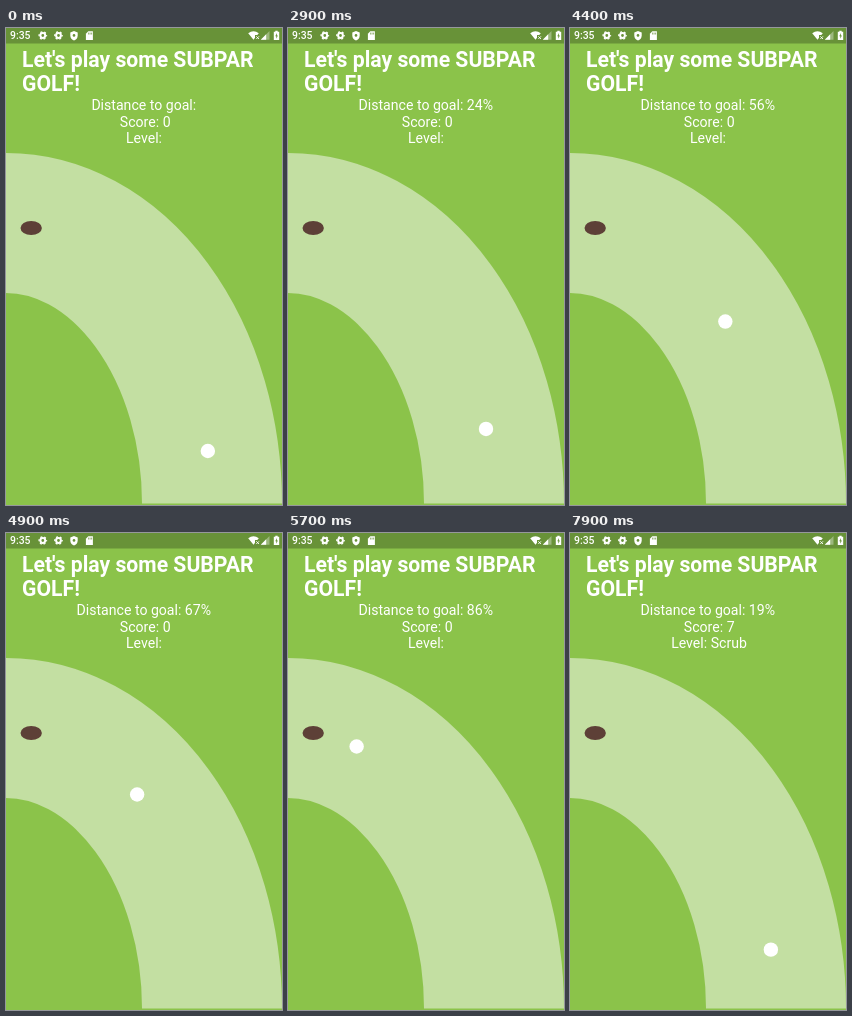
These frames come from a looping animation (276 by 477 pixels, 8000 ms). An HTML page:

```html
<!DOCTYPE html>
<html lang="en">
<head>
<meta charset="utf-8">
<title>Golf</title>
<style>
  html, body { margin: 0; width: 100%; height: 100%; overflow: hidden; background: #8bc34a; }
  svg { display: block; width: 276px; height: 477px; }
  text { font-family: Roboto, "Open Sans", sans-serif; fill: #fff; }
  .title { font-size: 21.2px; font-weight: 700; }
  .info { font-size: 14.1px; text-anchor: middle; }
  .clock { font-size: 10.4px; font-weight: 500; }
</style>
</head>
<body>
<svg viewBox="0 0 276 477">
  <defs>
    <g id="gear" fill="none" stroke="#fff">
      <circle r="2.4" stroke-width="2"/>
      <circle r="3.7" stroke-width="1.3" stroke-dasharray="1.94 1.94" stroke-dashoffset="1"/>
    </g>
  </defs>

  <rect width="276" height="477" fill="#8bc34a"/>
  <path d="M0 195A206 280.5 0 0 1 206 475.5" fill="none" stroke="#c3dfa2" stroke-width="140"/>
  <ellipse cx="25.2" cy="200" rx="10.7" ry="7.1" fill="#5d4037"/>
  <circle id="ball" r="7.2" fill="#fff"/>

  <rect width="276" height="15.5" fill="#689238"/>
  <text class="clock" x="4" y="11.2">9:35</text>
  <use href="#gear" x="36.800" y="7.500"/>
  <use href="#gear" x="52.500" y="7.500"/>
  <path d="M68 3L71.700 4.500V7.400C71.700 9.800 70.200 11.700 68 12.400C65.800 11.700 64.300 9.800 64.300 7.400V4.500Z" fill="#fff"/>
  <circle cx="68" cy="7.400" r="1.300" fill="#689238"/>
  <path d="M82.300 3.300H86.900V12H79.900V5.700Z" fill="#fff"/>
  <path d="M82.600 4.600V6.500M84.100 4.600V6.500M85.600 4.600V6.500" stroke="#689238" stroke-width=".7"/>
  <path d="M242.200 5.200Q247.500 1.200 252.800 5.200L251.300 7H249V9.800L247.500 11.700Z" fill="#fff"/>
  <path d="M250.300 8.300L253 11M253 8.300L250.300 11" stroke="#fff" stroke-width=".9"/>
  <path d="M263.500 3V11.700H254.800Z" fill="#fff" opacity=".35"/>
  <path d="M260.200 6.300V11.700H254.800Z" fill="#fff"/>
  <path d="M269.300 2.700H271.700V3.700H273.200V12H267.800V3.700H269.300Z" fill="#fff"/>
  <path d="M270.900 5L269.300 8.200H270.300V10.700L271.900 7.400H270.900Z" fill="#689238"/>

  <text class="title" x="16" y="38.8">Let's play some SUBPAR</text>
  <text class="title" x="16" y="63.3">GOLF!</text>
  <text class="info" id="goal" x="137.800" y="82.400"></text>
  <text class="info" id="score" x="139.200" y="98.800"></text>
  <text class="info" id="level" y="115.200"></text>
</svg>

<script>
const LOOP = 8000, START = 2700, RESET = 6300, RESTART = 7900;

// Percent along the course for each drag update; updates come in bursts of three.
const drag = [
  19, 21, 24, 26, 28, 30, 31, 33, 34, 41, 45, 50, 53, 56,
  59, 62, 64, 67, 69, 71, 73, 78, 82, 86, 91, 95, 98
];
// Percent and angle on the centre line of the fairway.
const course = [[17, 10.97], [24, 15.63], [41, 28.06], [67, 50.37], [86, 70.5], [99, 83.7]];

const el = id => document.getElementById(id);
const ball = el("ball"), level = el("level");

function setText(id, value) {
  const node = el(id);
  if (node.textContent !== value) node.textContent = value;
}

function percentAt(t) {
  if (t >= RESTART) return 19;
  if (t < START || t >= RESET) return 17;
  const dt = t - START;
  const step = Math.min(2, Math.floor(dt % 400 / 100));
  return drag[Math.floor(dt / 400) * 3 + step];
}

function angleAt(p) {
  let i = 1;
  while (i < course.length - 1 && p > course[i][0]) i++;
  const [p0, a0] = course[i - 1], [p1, a1] = course[i];
  return (a0 + (a1 - a0) * (p - p0) / (p1 - p0)) * Math.PI / 180;
}

function draw(t) {
  const p = percentAt(t), a = angleAt(p), scored = t >= RESET;
  ball.setAttribute("cx", 205.6 * Math.cos(a));
  ball.setAttribute("cy", 476 - 278.5 * Math.sin(a));
  setText("goal", "Distance to goal:" + (t < START ? "" : ` ${p}%`));
  setText("score", "Score: " + (scored ? 7 : 0));
  setText("level", scored ? "Level: Scrub" : "Level:");
  level.setAttribute("x", scored ? 139 : 138);
}

function tick() {
  draw(performance.now() % LOOP);
  requestAnimationFrame(tick);
}
tick();
</script>
</body>
</html>
```
